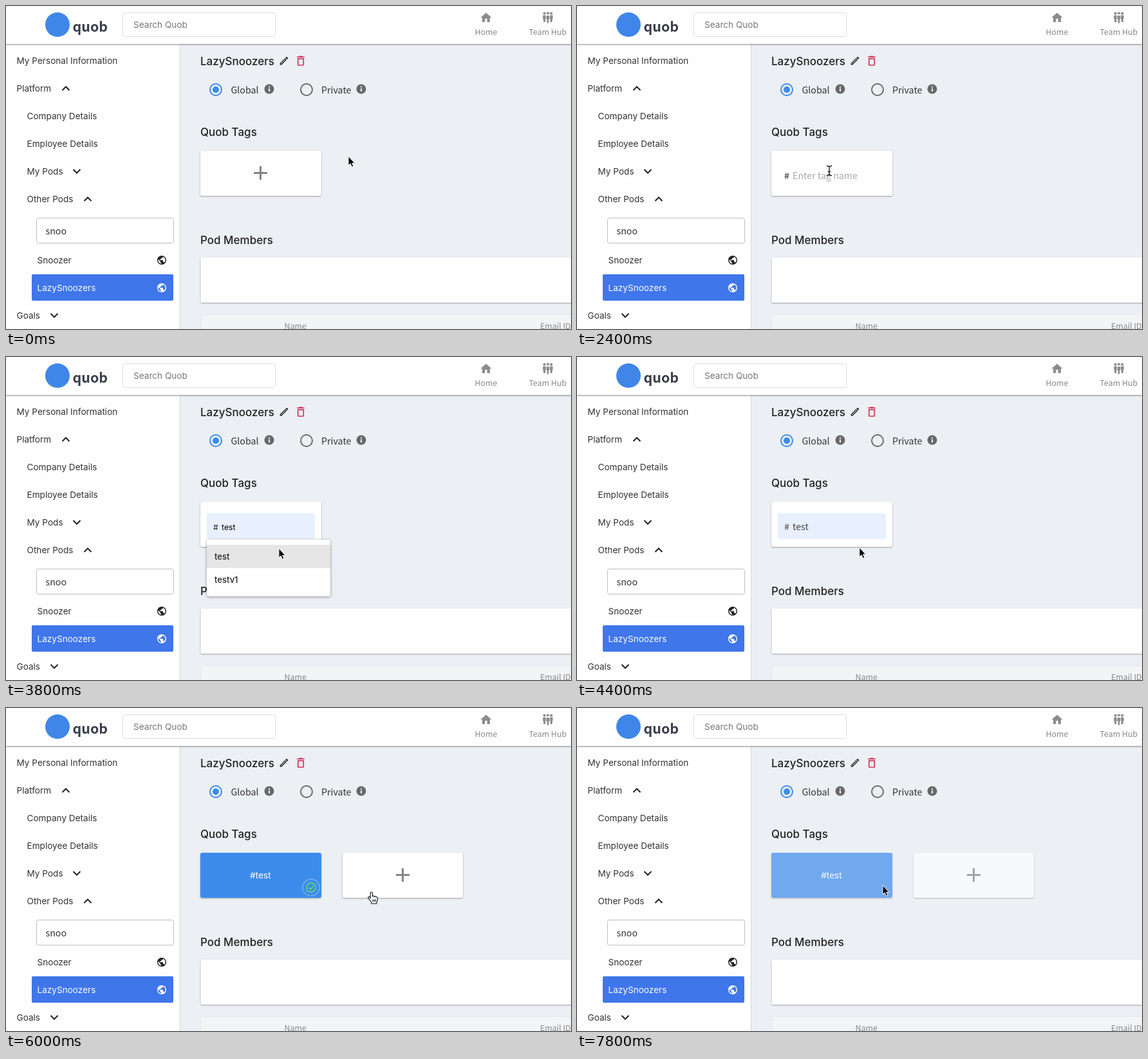
Animation, 878 px wide and 502 px high, one loop 8 s. Source, as an HTML page:

```html
<!DOCTYPE html>
<html lang="en">
<head>
<meta charset="utf-8">
<title>Pod tags</title>
<style>
html, body { margin: 0; width: 100%; height: 100%; overflow: hidden; background: #eceff3; }
svg { display: block; width: 878px; height: 502px; }
text { font: 13.6px Inter, sans-serif; fill: #333; white-space: pre; }
.alt { font: 14.25px "Noto Sans CJK JP", "Noto Sans CJK SC", "Noto Sans", sans-serif; }
.nav { font-size: 12.4px; fill: #888; }
.title { font-size: 17px; font-weight: 500; fill: #222; }
.brand { font-size: 21.4px; font-weight: 700; fill: #3a3d4a; }
.option { font-size: 13px; font-weight: 500; fill: #222; }
.card { fill: #fefefe; filter: drop-shadow(0 1px 1px #0005); }
.line { fill: none; stroke: #222; stroke-width: 2; }
</style>
</head>
<body>
<svg viewBox="0 0 878 502">
  <defs>
    <path id="up" class="line" d="M-5.5 3 0-2.5 5.5 3"/>
    <path id="down" class="line" d="M-5.5-3 0 2.5 5.5-3"/>
    <path id="globe" transform="scale(.7) translate(-12 -12)" d="M12 2C6.48 2 2 6.48 2 12s4.48 10 10 10 10-4.48 10-10S17.52 2 12 2zm-1 17.93c-3.95-.49-7-3.85-7-7.93 0-.62.08-1.21.21-1.79L9 15v1c0 1.1.9 2 2 2v1.93zm6.9-2.54c-.26-.81-1-1.39-1.9-1.39h-1v-3c0-.55-.45-1-1-1H8v-2h2c.55 0 1-.45 1-1V7h2c1.1 0 2-.9 2-2v-.41c2.93 1.19 5 4.06 5 7.41 0 2.08-.8 3.97-2.1 5.39z"/>
    <g id="info">
      <circle r="7.5" fill="#686868"/>
      <path d="M0-4.2v2M0-.9v5" stroke="#fff" stroke-width="1.8"/>
    </g>
    <path id="plus" d="M-10.5 0h21M0-10.5v21" stroke="#848484" stroke-width="3"/>
    <g id="person">
      <circle r="2.3" cy="-6"/>
      <path d="M-2.7-2.8h5.4v6H1.7V9h-3.4V3.2h-1z"/>
    </g>
  </defs>

  <!-- sidebar -->
  <path d="M0 59h270v443H0z" fill="#fefefe"/>
  <path d="M270.5 59v443" stroke="#d3d6da"/>
  <text x="16.5" y="90">My Personal Information</text>
  <text x="16.5" y="133">Platform</text>
  <text x="32.5" y="176">Company Details</text>
  <text x="32.5" y="219">Employee Details</text>
  <text x="32.5" y="262">My Pods</text>
  <text x="32.5" y="305">Other Pods</text>
  <text x="16.5" y="486">Goals</text>
  <use href="#up" x="93" y="128"/>
  <use href="#down" x="110" y="257"/>
  <use href="#up" x="127" y="300"/>
  <use href="#down" x="75" y="481"/>
  <rect x="47.5" y="329.5" width="213" height="39" rx="3" fill="#fff" stroke="#bdbdbd"/>
  <text class="alt" x="61.5" y="355">snoo</text>
  <text x="48.5" y="400">Snoozer</text>
  <use href="#globe" x="242" y="395" fill="#222"/>
  <rect x="40" y="417" width="220" height="41" rx="2" fill="#3f76ea"/>
  <text x="48.5" y="443" style="fill:#fff">LazySnoozers</text>
  <use href="#globe" x="242" y="438" fill="#fff"/>

  <!-- header -->
  <path d="M0 0h878v59H0z" fill="#fefefe" style="filter:drop-shadow(0 1px 1px #0007)"/>
  <circle cx="80" cy="29" r="19" fill="#3f86e8"/>
  <text class="alt brand" x="103.5" y="40">quob</text>
  <rect x="181.5" y="10.5" width="237" height="37" rx="3" fill="#fff" stroke="#dcdcdc"/>
  <text x="198" y="34" style="fill:#777">Search Quob</text>
  <g fill="#8b8b8b">
    <path transform="translate(735.8 7.9) scale(.85)" d="M10 20v-6h4v6h5v-8h3L12 3 2 12h3v8z"/>
    <use href="#person" transform="translate(836.7 17) scale(.9)"/>
    <use href="#person" transform="translate(847.3 17) scale(.9)"/>
    <use href="#person" transform="translate(842 17.5) scale(1.05)" stroke="#fefefe" stroke-width=".8"/>
  </g>
  <text class="alt nav" x="728.5" y="45">Home</text>
  <text class="alt nav" x="812.5" y="45">Team Hub</text>

  <!-- pod page -->
  <text class="title" x="302" y="92">LazySnoozers</text>
  <path transform="translate(423.6 76.8) scale(.7)" fill="#222" d="M14.06 9.02l.92.92L5.92 19H5v-.92l9.06-9.06M17.66 3c-.25 0-.51.1-.7.29l-1.83 1.83 3.75 3.75 1.83-1.83c.39-.39.39-1.02 0-1.41l-2.34-2.34c-.2-.2-.45-.29-.71-.29zm-3.6 3.19L3 17.25V21h3.75L17.81 9.94l-3.75-3.75z"/>
  <path transform="translate(447.8 75) scale(.85)" fill="#d0365a" d="M16 9v10H8V9h8m-1.5-6h-5l-1 1H5v2h14V4h-3.5l-1-1zM18 7H6v12c0 1.1.9 2 2 2h8c1.1 0 2-.9 2-2V7z"/>
  <circle cx="326" cy="130" r="9" fill="none" stroke="#3c8cea" stroke-width="2"/>
  <circle cx="326" cy="130" r="5" fill="#3c8cea"/>
  <text class="alt" x="349.5" y="136">Global</text>
  <use href="#info" x="409" y="129"/>
  <circle cx="467" cy="130" r="9" fill="none" stroke="#6b6b6b" stroke-width="2"/>
  <text class="alt" x="490" y="136">Private</text>
  <use href="#info" x="552" y="129"/>
  <text class="title" x="302" y="202">Quob Tags</text>
  <text class="title" x="302" y="370">Pod Members</text>
  <rect class="card" x="302.5" y="391" width="600" height="70" rx="2"/>
  <rect x="302.5" y="479.5" width="600" height="40" rx="2" fill="#f3f4f6" stroke="#e3e6ea"/>
  <text class="alt nav" x="432.5" y="502">Name</text>
  <text class="alt nav" x="830" y="502">Email ID</text>

  <!-- tag cards -->
  <rect id="first" class="card" x="302" y="225" width="188" height="70" rx="3"/>
  <use id="add" href="#plus" x="395.5" y="259.5"/>
  <g id="entry">
    <rect id="field" x="312" y="243" width="168" height="40" rx="3" fill="#e7f0fc"/>
    <text id="hash" class="alt" x="322" y="269">#</text>
    <text id="value" class="alt" x="335" y="269"></text>
  </g>
  <g id="saved">
    <rect class="card" x="302" y="225" width="188" height="70" rx="3" style="fill:#3d8ceb"/>
    <text x="395.5" y="265" text-anchor="middle" style="fill:#fff">#test</text>
    <g id="badge" fill="none">
      <circle cx="474" cy="279" r="13" stroke="#76aef2" stroke-width="1.5"/>
      <g stroke="#62e36c" stroke-width="1.5">
        <circle cx="474" cy="279" r="7"/>
        <path d="m470.6 279 2.5 2.6 4.4-4.9"/>
      </g>
    </g>
    <rect class="card" x="523" y="225" width="187" height="70" rx="3"/>
    <use href="#plus" x="616.5" y="259.5"/>
  </g>
  <g id="list">
    <rect class="card" x="312" y="284" width="192" height="88" rx="3" style="filter:drop-shadow(0 1px 2px #0006)"/>
    <rect id="hover" x="312" y="292" width="192" height="36" fill="#e5e6e5"/>
    <text class="option" x="324" y="315">test</text>
    <text class="option" x="324" y="351">testv1</text>
  </g>
  <g id="tip">
    <rect x="427" y="266" width="87" height="15" rx="2" fill="#616161"/>
    <text x="470.5" y="276.5" text-anchor="middle" style="font-size:8px;fill:#fff">Add a new pod tag</text>
  </g>

  <!-- pointers -->
  <path id="arrow" d="M0-.5V14l3.2-3 2.4 5.3 2.4-1.1-2.3-5H10z" fill="#000" stroke="#fff" stroke-width="1"/>
  <path id="hand" d="M-1.7 9.5V1.6a1.6 1.6 0 0 1 3.2 0V7a1.6 1.6 0 0 1 3 .4 1.5 1.5 0 0 1 2.7.6 1.4 1.4 0 0 1 2.1 1.2V12c0 2-1 3-1.4 4.5V18H0v-1.5C-1.5 14-3 12-5 9.6c-1-1.6.8-2.8 2-1.8zM2 11.5v3.5M4.2 11.5v3.5M6.4 11.5v3.5" fill="#fff" stroke="#111" stroke-width="1.1"/>
  <path id="beam" d="M-4-7.5q4 0 4 2 0-2 4-2M0-5.5v11M-4 7.5q4 0 4-2 0 2 4 2M-2 1.5h4" fill="none" stroke="#111" stroke-width="1.3"/>
</svg>
<script>
const LOOP = 8000, STEP = 200;
const $ = id => document.getElementById(id);
const show = (id, on) => $(id).style.display = on ? '' : 'none';

// pointer stops: time, x, y
const stops = [
  [0, 532, 234], [200, 532, 234], [1200, 396, 254], [1600, 396, 254],
  [2000, 392, 256], [3200, 392, 256], [3800, 424, 298], [4200, 424, 298],
  [5200, 567, 285], [5800, 567, 285], [6000, 568, 286], [6400, 568, 286],
  [7400, 475, 276], [LOOP, 475, 276]
];

function pointer(t) {
  const i = stops.findIndex(s => s[0] > t);
  const [t0, x0, y0] = stops[i - 1], [t1, x1, y1] = stops[i];
  const p = (t - t0) / (t1 - t0), e = p * p * (3 - 2 * p);
  return [x0 + (x1 - x0) * e, y0 + (y1 - y0) * e];
}

function kind(t, x, y) {
  if (t >= 2600 && t < 3200) return '';
  if (t < 1800) return x < 490 ? 'hand' : 'arrow';
  if (t < 4600 && y < 284) return 'beam';
  const overAdd = t >= 6000 && x > 523 && y < 295;
  const overBadge = t >= 6600 && t < 7800 && Math.hypot(x - 474, y - 279) < 13;
  return overAdd || overBadge ? 'hand' : 'arrow';
}

function draw(t) {
  const editing = t >= 1800 && t < 5800;
  const typed = 'test'.slice(0, Math.max(0, Math.floor((t - 2400) / STEP)));
  const [x, y] = pointer(t);
  const preview = t >= 3600 && t < 4200;

  show('first', t < 5800);
  show('add', t < 1800);
  show('entry', editing);
  show('field', t >= 3600);
  $('value').textContent = typed || 'Enter tag name';
  $('value').style.fill = typed ? (preview ? '#000' : '#444') : '#aaa';
  $('hash').style.fill = t < 4200 ? '#222' : '#444';
  for (const id of ['hash', 'value'])
    $(id).style.font = preview ? '12.3px Inter, sans-serif' : '';

  show('list', t >= 2600 && t < 4200);
  show('hover', preview);
  $('tip').style.opacity = t === 1400 ? .08 : t === 1600 ? .9 : 0;

  show('saved', t >= 5800);
  show('badge', t < 7800);
  $('saved').style.opacity = t < 7800 ? 1 : .7;

  const current = kind(t, x, y);
  for (const id of ['arrow', 'hand', 'beam']) {
    show(id, id === current);
    $(id).setAttribute('transform', `translate(${x} ${y})`);
  }
}

const start = performance.now();
function tick() {
  const t = (performance.now() - start) % LOOP;
  draw(Math.floor(t / STEP) * STEP);
  requestAnimationFrame(tick);
}
tick();
</script>
</body>
</html>
```
